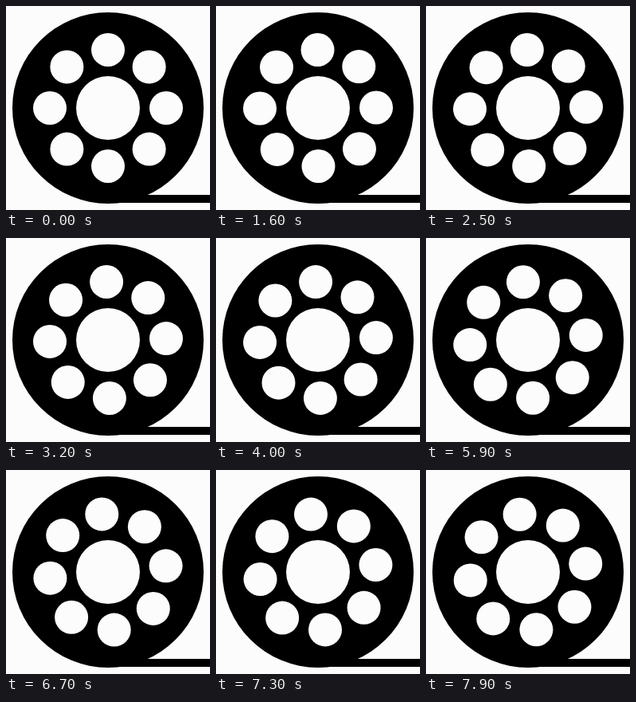
Recreate the animation shown at these times as an HTML page with a canvas. Size 256x256 px, loop 8000 ms.

```html
<!DOCTYPE html>
<html lang="en">
<head>
<meta charset="utf-8">
<title>Film reel</title>
<style>
  html, body { margin: 0; width: 100%; height: 100%; overflow: hidden; background: #fcfcfc; }
  canvas { display: block; }
</style>
</head>
<body>
<canvas id="stage" width="256" height="256"></canvas>
<script>
const LOOP = 8000, STEP = 100;
const PAPER = '#fcfcfc', INK = '#000';
const CENTER = 128, REEL = 120, HUB = 40, HOLE = 21, ORBIT = 73, HOLES = 8;
const ctx = document.getElementById('stage').getContext('2d');

function disc(x, y, r, color) {
  ctx.fillStyle = color;
  ctx.beginPath();
  ctx.arc(x, y, r, 0, Math.PI * 2);
  ctx.fill();
}

// The slow start holds its pose longer before the regular steps begin.
function poseTime(ms) {
  if (ms >= 1200) return Math.floor(ms / STEP) * STEP;
  return [1000, 800, 500, 0].find(t => ms >= t);
}

// Gently easing-in turn, in radians.
function turn(ms) {
  const s = ms / 1000;
  return (0.155 * s * s - 0.003 * s * s * s) * Math.PI / 180;
}

function draw(ms) {
  const angle = turn(poseTime(ms));
  ctx.fillStyle = PAPER;
  ctx.fillRect(0, 0, 256, 256);
  disc(CENTER, CENTER, REEL, INK);
  ctx.fillRect(CENTER, 237, 128, 10);
  disc(CENTER, CENTER, HUB, PAPER);
  for (let i = 0; i < HOLES; i++) {
    const a = i * Math.PI * 2 / HOLES - angle;
    disc(CENTER + ORBIT * Math.cos(a), CENTER + ORBIT * Math.sin(a), HOLE, PAPER);
  }
}

const start = performance.now();
function tick() {
  draw((performance.now() - start) % LOOP);
  requestAnimationFrame(tick);
}
tick();
</script>
</body>
</html>
```
